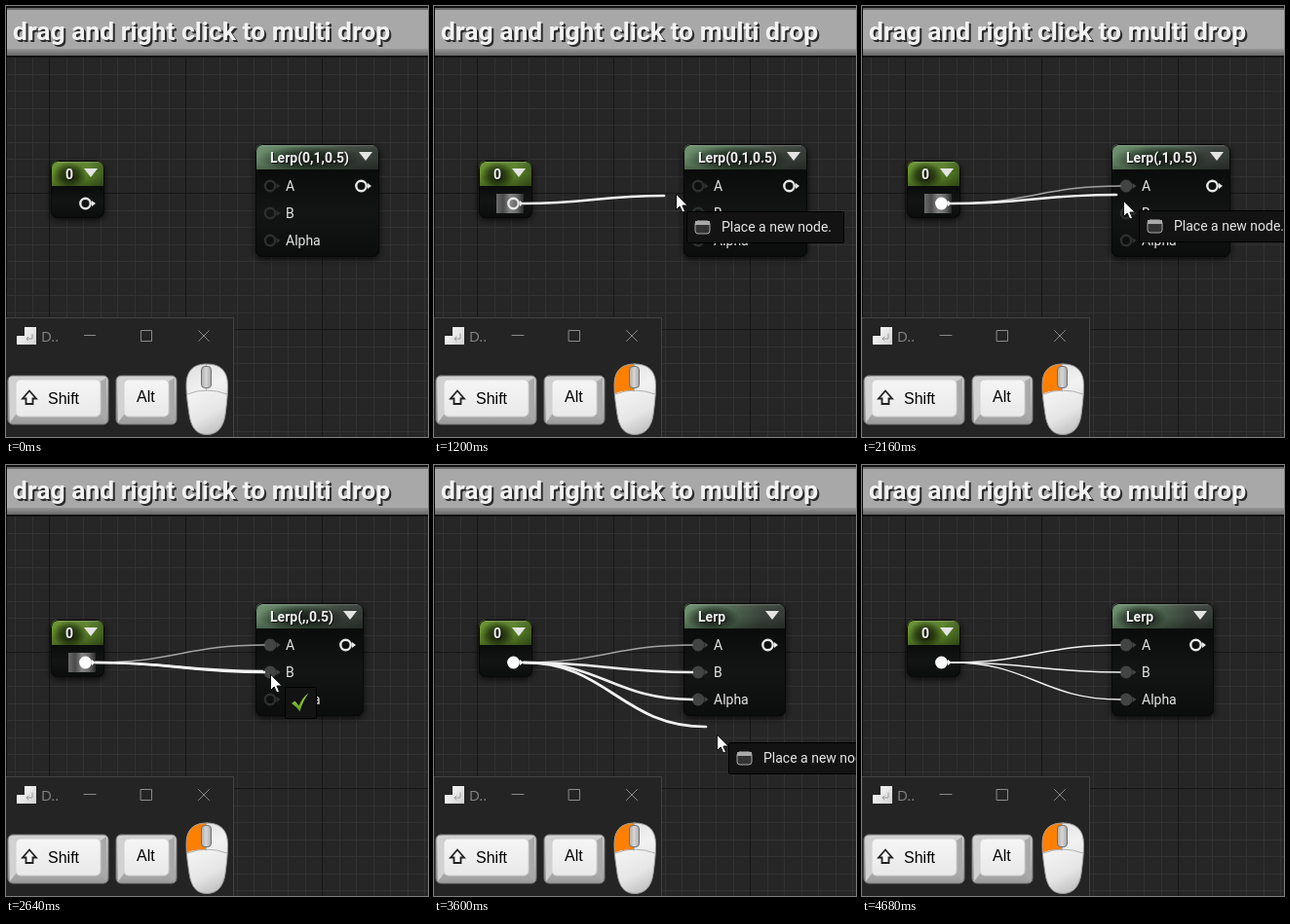
Animation, 433 px wide and 443 px high, one loop 4740 ms. Source, as an HTML page with a canvas:

```html
<!DOCTYPE html>
<html lang="en">
<head>
<meta charset="utf-8">
<title>Multi drop</title>
<style>
  html, body { margin: 0; width: 100%; height: 100%; overflow: hidden; background: #262626; }
  canvas { display: block; }
</style>
</head>
<body>
<canvas id="stage" width="433" height="443"></canvas>
<script>
const W = 433, H = 443, LOOP = 4740, STEP = 60;
const canvas = document.getElementById('stage');
const ctx = canvas.getContext('2d');
const UI = 'Roboto, "Open Sans", sans-serif';
const KEY = '"Liberation Sans", Arial, sans-serif';

// Pointer path: time, x, y
const PATH = [
  [60, 387, 66], [180, 310, 96], [300, 190, 150], [420, 105, 190], [540, 82, 198],
  [600, 90, 203], [840, 90, 203], [960, 160, 202], [1020, 219, 197], [1080, 238, 196],
  [1320, 258, 190], [1440, 267, 184], [1980, 267, 184], [2280, 269, 210],
  [2580, 270, 212], [2640, 271, 215], [2880, 273, 245], [3360, 273, 245], [3600, 290, 277],
  [3900, 288, 270], [4020, 289, 267], [4080, 328, 224], [4140, 391, 154], [4200, 419, 116]
];
// Lerp node: start time, title, right edge
const TITLES = [
  [0, 'Lerp(0,1,0.5)', 383], [1860, 'Lerp(,1,0.5)', 378],
  [2580, 'Lerp(,,0.5)', 367], [3360, 'Lerp', 361]
];
const INPUTS = [['A', 185, 1860], ['B', 213, 2580], ['Alpha', 241, 3360]];
const LEFT = [[780, 3720], [4680, LOOP]];
const RIGHT = [[1680, 1860], [2340, 2520], [3120, 3300]];
const CHECK = [[1440, 2040], [2220, 3420]];
const DRAG = [[900, 3720]];

const within = (t, spans) => spans.some(([a, b]) => t >= a && t < b);

function pointerAt(t) {
  if (t < 60 || t >= 4260) return null;
  const i = PATH.findIndex(p => p[0] > t);
  if (i < 0) return PATH[PATH.length - 1].slice(1);
  const [t0, x0, y0] = PATH[i - 1], [t1, x1, y1] = PATH[i];
  const k = (t - t0) / (t1 - t0);
  return [Math.round(x0 + (x1 - x0) * k), Math.round(y0 + (y1 - y0) * k)];
}

function rect(x, y, w, h, fill) {
  ctx.fillStyle = fill;
  ctx.fillRect(x, y, w, h);
}

function box(x, y, w, h, r, fill, stroke, width = 1) {
  ctx.beginPath();
  ctx.roundRect(x, y, w, h, r);
  if (fill) { ctx.fillStyle = fill; ctx.fill(); }
  if (stroke) { ctx.strokeStyle = stroke; ctx.lineWidth = width; ctx.stroke(); }
}

function shape(d, fill, stroke, width = 1) {
  const p = new Path2D(d);
  if (fill) { ctx.fillStyle = fill; ctx.fill(p); }
  if (stroke) { ctx.strokeStyle = stroke; ctx.lineWidth = width; ctx.stroke(p); }
}

function blend(x0, y0, x1, y1, ...colors) {
  const g = ctx.createLinearGradient(x0, y0, x1, y1);
  colors.forEach((c, i) => g.addColorStop(i / (colors.length - 1), c));
  return g;
}

function label(str, x, y, font, fill, offset, shade = '#111') {
  ctx.font = font;
  if (offset) { ctx.fillStyle = shade; ctx.fillText(str, x + offset, y + offset); }
  ctx.fillStyle = fill;
  ctx.fillText(str, x, y);
}

function drawGrid() {
  rect(0, 0, W, H, '#262626');
  const line = (p, color) => {
    rect(Math.round(44 + p), 0, 1, H, color);
    rect(0, Math.round(52 + p), W, 1, color);
  };
  for (let i = -3; i < 24; i++) if (i % 8) line(i * 17.5, '#323232');
  for (let i = 0; i < 4; i++) line(i * 140, '#161616');
}

function drawBanner() {
  rect(0, 0, W, 53, '#111');
  rect(1, 2, W - 1, 2, '#6c6c6c');
  rect(1, 4, W - 1, 40, '#a8a8a8');
  rect(1, 44, W - 1, 7, blend(0, 44, 0, 51, '#969696', '#666'));
  label('drag and right click to multi drop', 7, 34.5, 'bold 26.5px ' + UI, '#f2f2f2', 2, '#2c2c2c');
  rect(0, 0, 1, H, '#0b0b0b');
}

function drawNode(x, y, right, bottom, title, tint) {
  const w = right - x, h = bottom - y;
  ctx.save();
  ctx.shadowColor = 'rgba(0,0,0,.75)';
  ctx.shadowBlur = 7;
  ctx.shadowOffsetY = 2;
  box(x, y, w, h, 7, '#0c0e0d');
  ctx.restore();
  ctx.save();
  ctx.beginPath();
  ctx.roundRect(x, y, w, h, 7);
  ctx.clip();
  rect(x, y, w, h, blend(0, y + 26, 0, bottom, '#0a0c0b', '#131514', '#0b0d0c'));
  rect(x, y, w, 26, blend(x, 0, right, 0, ...tint));
  rect(x, y, w, 26, blend(0, y, 0, y + 26, 'rgba(255,255,255,.1)', 'rgba(0,0,0,0)', 'rgba(0,0,0,.3)'));
  ctx.font = 'bold 14px ' + UI;
  const half = ctx.measureText(title).width / 2;
  ctx.translate(x + 15 + half, y + 15);
  ctx.scale(half + 14, 13);
  const glow = ctx.createRadialGradient(0, 0, 0, 0, 0, 1);
  glow.addColorStop(0, 'rgba(0,0,0,.7)');
  glow.addColorStop(.5, 'rgba(0,0,0,.5)');
  glow.addColorStop(1, 'rgba(0,0,0,0)');
  rect(-1, -1, 2, 2, glow);
  ctx.restore();
  box(x + .5, y + .5, w - 1, h - 1, 7, null, '#070807');
  rect(x + 6, y + 1, w - 12, 1, 'rgba(255,255,255,.16)');
  label(title, x + 15, y + 19, 'bold 14px ' + UI, '#f2f2f2', 1);
  shape(`M${right - 21} ${y + 8}h14l-7 9z`, '#e4e4e4');
}

function drawPin(x, y, color, filled) {
  ctx.beginPath();
  ctx.arc(x, y, 5.2, 0, 7);
  ctx.strokeStyle = color;
  ctx.lineWidth = 2.4;
  ctx.stroke();
  if (filled) { ctx.fillStyle = color; ctx.fill(); }
  shape(`M${x + 6.5} ${y - 3}l4 3l-4 3z`, color);
}

function drawWire(x, y, width, color) {
  const reach = Math.max(12, Math.abs(x - 92) * .46);
  ctx.lineCap = 'round';
  shape(`M92 203C${92 + reach} 203 ${x - reach} ${y} ${x} ${y}`, null, color, width);
}

function drawNodes(t) {
  drawNode(46, 159, 101, 218, '0', ['#6c9a2f', '#557b24', '#5b8428', '#41601e']);
  if (t >= 600 && t < 2700) {
    rect(64, 193, 28, 20, blend(64, 0, 92, 0, '#6a6a6a', '#4a4a4a', '#858585', '#6a6a6a', '#2a2a2a'));
  }
  drawPin(81.5, 203, t >= 1860 ? '#fff' : '#e8e8e8', t >= 1860);

  const [, title, right] = TITLES.filter(s => t >= s[0]).pop();
  drawNode(256, 142, right, 258, title, ['#6f9270', '#57775a', '#4b624d', '#3b443c', '#353a36']);
  if (t >= 1440 && t < 1680) rect(260, 176, 36, 18, blend(260, 0, 296, 0, '#1b1b1b', '#303030', '#151515'));
  for (const [name, y, joined] of INPUTS) {
    drawPin(271, y, t >= joined ? '#414443' : '#2d302f', t >= joined);
    label(name, 287, y + 5, '14px ' + UI, '#e6e6e6', 1);
  }
  drawPin(right - 18.5, 185, '#e8e8e8', false);
}

function drawWires(t, anchor) {
  const dragging = within(t, DRAG);
  INPUTS.forEach(([, y, joined], i) => {
    if (t < joined) return;
    if (!dragging) drawWire(265, y, 1.4, '#f0f0f0');
    else if (i === 0) drawWire(265, y, 1.4, '#a2a2a2');
    else drawWire(265, y, 2.5, '#eee');
  });
  if (dragging) drawWire(Math.max(93, anchor[0] - 7), anchor[1], 2.7, '#f2f2f2');
}

function drawTooltip(t, [px, py]) {
  const x = px + 16, y = py + 16, check = within(t, CHECK);
  box(x + .5, y + .5, check ? 32 : 161, 32, 1, '#121312', '#000');
  if (check) {
    shape(`M${x + 7} ${y + 17}l3.500 -2.500l4 5q4 -9 10 -13q-6 8 -9 19q-3 -5 -8.500 -8.500z`,
      blend(0, y + 7, 0, y + 26, '#a2d848', '#5b9a22'));
  } else {
    box(x + 9, y + 10, 15, 13, 3, '#333', '#aaa');
    rect(x + 9, y + 10, 15, 4, '#aaa');
    label('Place a new node.', x + 36, y + 21, '14px ' + UI, '#e6e6e6');
  }
}

function drawPointer(t, [x, y]) {
  if (t >= 600 && t < 900) {
    ctx.save();
    ctx.globalCompositeOperation = 'difference';
    rect(x - 1, y - 12, 2, 25, '#fff');
    rect(x - 12, y - 1, 11, 2, '#fff');
    rect(x + 1, y - 1, 11, 2, '#fff');
    ctx.restore();
  } else {
    shape(`M${x + .5} ${y + .5}v16l3.700 -3.500l2.600 6l2.700 -1.200l-2.600 -5.800h5z`, '#fff', '#111');
  }
}

function drawKey(x, w, text, textX, textY) {
  box(x, 380, w, 50, 5, blend(0, 380, 0, 430, '#d4d4d4', '#bcbcbc', '#9c9c9c'), '#777');
  shape(`M${x + 2} 382l6 4v34l-6 8z`, '#d2d2d2');
  shape(`M${x + w - 2} 382l-6 4v34l6 8z`, '#a9a9a9');
  box(x + 8, 384, w - 16, 38, 5, blend(0, 384, 0, 422, '#f5f5f5', '#e9e9e9'), '#d0d0d0');
  label(text, textX, textY, '16px ' + KEY, '#000');
}

function drawMouse(left, right) {
  const body = 'M206 368C191 368 185 376 185 390C185 402 187 412 188 420C190 434 196 440.500 206 440.500C216 440.500 223 434 225 420C226 412 227.500 402 227.500 390C227.500 376 221 368 206 368Z';
  shape(body, blend(190, 372, 224, 440, '#e2e2e2', '#f2f2f2', '#e6e6e6', '#b8b8b8'));
  ctx.save();
  ctx.clip(new Path2D(body));
  if (left) shape('M184 366H205V396Q194 394 184 399Z', '#ff8000');
  if (right) shape('M206 366H229V399Q217 394 206 396Z', '#ff8000');
  ctx.restore();
  shape('M186 399Q206 391 227 399M205.500 368V396', null, '#b0b0b0');
  shape(body, null, '#9a9a9a');
  box(200.5, 370.500, 10, 22, 3.5, blend(200, 0, 211, 0, '#aaa', '#d6d6d6', '#a2a2a2'), '#707070');
}

function drawKeyWindow(t) {
  rect(0, 320, 234, 123, '#242424');
  shape('M0 320.500H233.500V443', null, '#434343');
  shape('M19 330h12v18h-20v-9h8z', blend(11, 330, 31, 348, '#fff', '#d2d2d2'));
  shape('M27 337v5h-6m2 -2l-2 2l2 2', null, '#999');
  label('D..', 36, 344.500, '15px "Open Sans", sans-serif', '#858585');
  shape('M80 338.500h12M138.500 333.500h11v11h-11zM197.500 333.500l11 11m0 -11l-11 11', null, '#8a8a8a');
  drawKey(2, 103, 'Shift', 43, 409);
  shape('M24 395.500l-7 8h3.500v5.500h7v-5.500h3.500z', '#f4f4f4', '#222', 1.8);
  drawKey(113, 62, 'Alt', 134, 406.500);
  drawMouse(within(t, LEFT), within(t, RIGHT));
}

function draw(t) {
  const pointer = pointerAt(t);
  const anchor = pointerAt(t - STEP); // wire and tooltip trail by one step
  drawGrid();
  drawBanner();
  drawNodes(t);
  drawWires(t, anchor);
  drawKeyWindow(t);
  if (within(t, DRAG)) drawTooltip(t, anchor);
  if (pointer) drawPointer(t, pointer);
}

const start = performance.now();
function tick() {
  const t = (performance.now() - start) % LOOP;
  draw(Math.floor(t / STEP) * STEP);
  requestAnimationFrame(tick);
}
tick();
</script>
</body>
</html>
```
